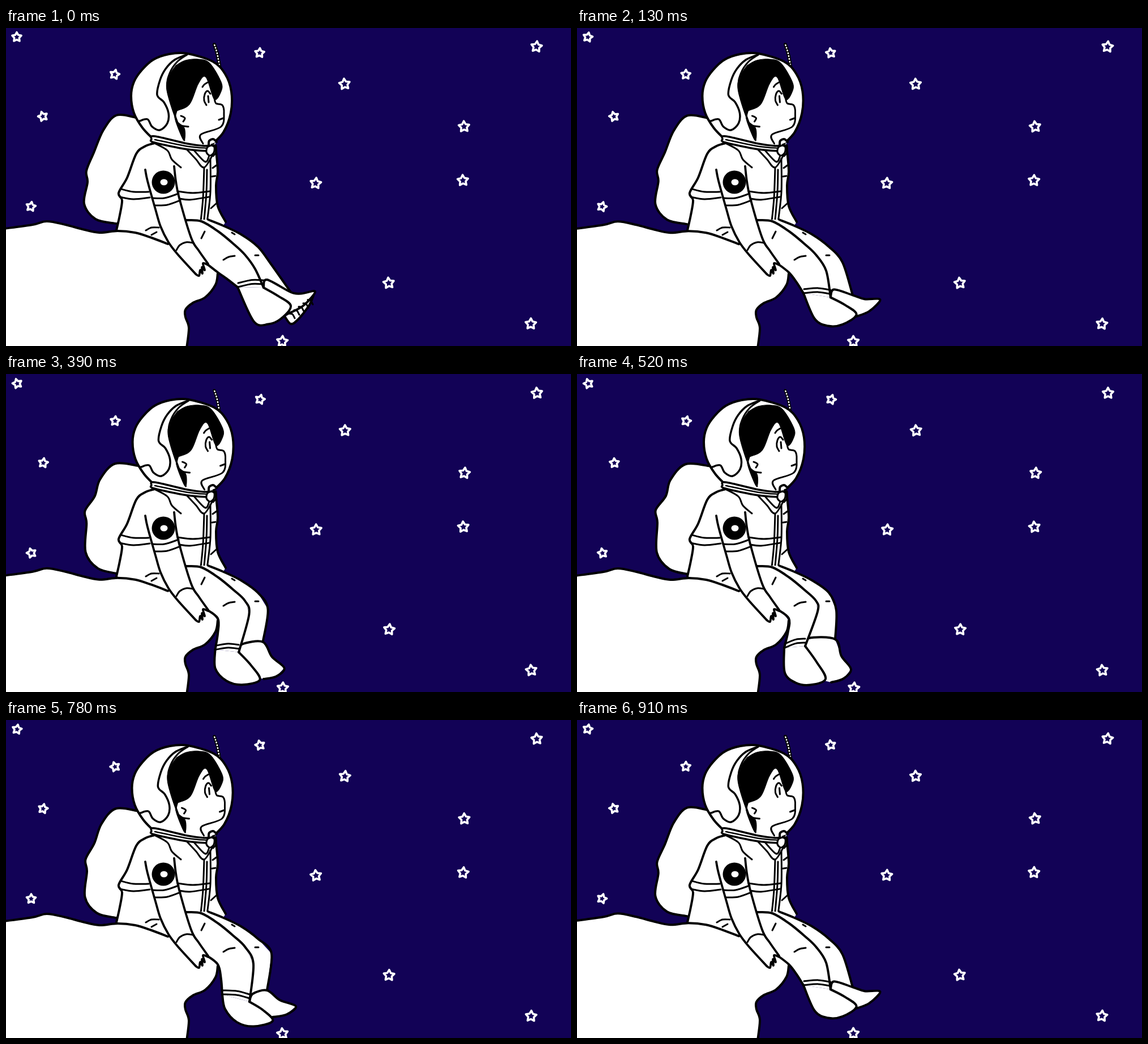
Recreate the animation shown at these times as an HTML page. Size 998 by 561 pixels, loop 1.04 s.

```html
<!DOCTYPE html>
<html lang="en">
<head>
<meta charset="utf-8">
<title>Astronaut swinging legs</title>
<style>
html, body { margin: 0; width: 100%; height: 100%; overflow: hidden; background: #120256; }
svg { display: block; width: 998px; height: 561px; }
path { stroke-linecap: round; stroke-linejoin: round; }
</style>
</head>
<body>
<svg id="stage" viewBox="0 0 998 561"></svg>
<script>
const STEP = 130, LAST = 4;
const stage = document.getElementById('stage');

// Points are [x, y] pairs, written as "x,y x,y"
const parse = s => s.split(' ').map(p => p.split(',').map(Number));
const add = (p, x, y) => [p[0] + x, p[1] + y];
const mix = (a, b, t) => [a[0] + (b[0] - a[0]) * t, a[1] + (b[1] - a[1]) * t];

// Smooth curve through the given points
function smooth(p) {
  let d = 'M' + p[0];
  for (let i = 0; i < p.length - 1; i++) {
    const a = p[i - 1] || p[i], b = p[i], c = p[i + 1], e = p[i + 2] || c;
    d += `C${mix(b, add(b, c[0] - a[0], c[1] - a[1]), 1 / 6)} ${mix(c, add(c, b[0] - e[0], b[1] - e[1]), 1 / 6)} ${c}`;
  }
  return d;
}

const toPoints = s => typeof s === 'string' ? parse(s) : s;
const draw = (d, w, fill = 'none', ink = '#000') =>
  `<path d="${d}" fill="${fill}" stroke="${ink}" stroke-width="${w}"/>`;
const line = (s, w = 3) => draw(smooth(toPoints(s)), w);
const lines = (list, w) => list.map(s => line(s, w)).join('');
const shape = (s, w = 4, fill = '#fff') => draw(smooth(toPoints(s)), w, fill);
const blank = p => `<path d="M${p.join('L')}Z" fill="#fff"/>`;
const shift = (x, y, body) => `<g transform="translate(${x} ${y})">${body}</g>`;

const STARS = '19,16 192,82 65,156 44,315 448,44 598,99 937,33 809,174 807,269 547,274 676,450 927,522 488,553';

function stars(t) {
  return parse(STARS).map(([x, y], i) => {
    const r = i < 5 ? 8.5 : 9.8;
    const turn = Math.sin(i * 2.3 + t * 5) * (i < 5 ? 0.3 : 0.12);
    const pts = Array.from({ length: 10 }, (_, k) => {
      const a = k * Math.PI / 5 - Math.PI / 2 + turn, q = k % 2 ? r * 0.53 : r;
      return [x + t + q * Math.cos(a), y + t + q * Math.sin(a)];
    });
    return draw(`M${pts.join('L')}Z`, 3.6, 'none', '#fff');
  }).join('');
}

function pack(t) {
  const up = parse('230,158 195,154 172,180 155,220 142,252 144,272 138,310 158,337 194,345');
  const down = parse('237,163 192,159 165,187 157,215 139,240 142,262 141,315 163,344 195,353');
  const pts = up.map((p, i) => mix(p, down[i], t));
  return blank([...pts, [262, 270], [270, 190]]) + shape(pts);
}

function torso() {
  const left = parse('262,203 245,209 230,222 214,264 199,291 205,304 201,330 195,357');
  const right = parse('370,207 374,252 371,278 374,314 388,342');
  return blank([...left, [285, 381], [350, 400], ...right.reverse(), [370, 190], [255, 190]]) +
    lines([left, right], 4) +
    lines(['203,284 225,289 252,289', '201,298 225,302 254,299', '303,288 330,291 360,288',
      '306,301 325,303 358,298', '320,215 335,231 350,246 366,222', '333,217 352,236 359,225',
      '350,247 348,300 344,341', '361,230 361,290 355,343', '355,250 354,290 350,338',
      '362,318 372,309', '365,247 372,242', '364,262 370,261', '247,357 257,352 270,352', '257,365 266,360']);
}

function ground(t) {
  const top = parse('-4,355 47,348 72,342 105,348 135,356 165,362 197,359 228,362 257,371 286,382');
  const edge = parse('374,434 370,454 352,476 330,486 317,498 317,511 323,530 319,566');
  return shift(0, t * 2 - 1, blank([...top, [345, 395], ...edge, [-4, 566]]) + lines([top, edge], 4));
}

// Each joint swings on a parabola: forward, middle, back
const JOINTS = {
  knee: '440,425 437,430 425,419',
  shin: '455,458 430,497 403,480',
  calf: '409,457 382,484 366,483',
  heel: '438,518 387,510 367,527',
  toe: '503,490 471,531 439,538',
  farKnee: '467,415 469,412 458,417',
  farShin: '503,466 461,477 456,468',
  farToe: '546,465 512,505 484,521',
  farHeel: '496,505 471,524 449,544'
};

function pose(t) {
  const swing = s => {
    const [a, b, c] = parse(s);
    return [0, 1].map(k => a[k] * (1 - t) * (1 - 2 * t) + b[k] * 4 * t * (1 - t) + c[k] * t * (2 * t - 1));
  };
  return Object.fromEntries(Object.entries(JOINTS).map(([name, s]) => [name, swing(s)]));
}

// Striped underside, seen only when the far foot is kicked up
function sole() {
  const a = [543, 472], b = [493, 510];
  let out = shape([a, [535, 490], [515, 515], [503, 522], b]);
  for (let k = 0.2; k < 1; k += 0.16) {
    const p = mix(a, b, k);
    out += line([p, add(p, 5, 1), add(p, 9, 8)]);
  }
  return out;
}

function legs(t) {
  const { knee, shin, calf, heel, toe, farKnee, farShin, farToe, farHeel } = pose(t);
  const near = [...parse('318,339 345,341 375,359 402,381 422,400'), knee, shin];
  const under = [...parse('352,414 374,431'), mix([378, 433], calf, 0.45), calf];
  const far = [...parse('357,338 382,348 415,364 445,386'), farKnee, farShin];

  const nx = (heel[1] - toe[1]) * 0.2, ny = (toe[0] - heel[0]) * 0.2;
  const boot = [calf, heel, add(mix(heel, toe, 0.3), nx, ny), add(mix(heel, toe, 0.65), nx, ny),
    toe, add(mix(shin, toe, 0.55), -nx / 4, -ny / 4), shin];
  const farBoot = [shin, add(shin, 6, -14), farShin, add(mix(farShin, farToe, 0.5), -3, 3),
    farToe, add(mix(farToe, farHeel, 0.5), 4, 5), farHeel];
  const cuff = h => line([add(calf, 1, 1 - h), add(mix(calf, shin, 0.55), 0, -5 - h), add(shin, 0, -5 - h)]);

  return blank([...far, ...[...near].reverse()]) + line(far, 4) +
    blank([...farBoot, mix(heel, toe, 0.5)]) + (t === 0 ? sole() : '') + line(farBoot, 4) +
    blank([...near, ...[...under].reverse()]) + shape(boot) + lines([near, under], 4) +
    cuff(1) + cuff(8) +
    lines(['345,371 351,359', '384,409 393,404 404,402', '399,361 404,364', '440,401 446,401']);
}

function arm() {
  const left = parse('246,250 250,270 264,320 273,350 287,378 303,399 335,434');
  const right = parse('297,244 300,270 306,300 327,370 340,392 357,416');
  const hand = parse('335,434 341,437 343,427 347,433 346,422 351,427 348,415 357,418');
  return blank([...left, ...hand, ...[...right].reverse()]) + lines([left, right, hand], 3.8) +
    lines(['258,300 280,300 305,292', '263,313 285,312 308,304', '301,392 307,383 318,378 331,379',
      '262,203 285,216 293,232 309,246']) +
    '<circle cx="278" cy="272" r="20.5"/><ellipse cx="279" cy="272" rx="6.5" ry="5.5" fill="#fff"/>';
}

function face() {
  return shape('300,66 317,57 340,55 360,62 380,95 380,112 368,126 353,87 340,98 324,135 301,147 298,156 284,110 287,86 300,66', 1, '#000') +
    shape('298,150 300,165 314,198 315,177 301,164 298,150', 1.5, '#000') +
    lines(['320,47 302,60 289,80 285,105 297,150 315,198', '301,146 299,158 307,171 322,174',
      '309,155 316,159 313,165', '347,104 350,100 356,96', '361,116 356,111 351,117 350,128 354,136',
      '368,124 371,133 382,136 385,150 380,174 344,188 348,204', '376,162 384,159', '357,120 358,131']);
}

function head(t) {
  const rod = smooth(parse('368,29 373,45 378,72'));
  return draw(rod, 6 - t) + `<path d="${rod}" fill="none" stroke="#fff" stroke-width="2.4" stroke-dasharray="3 2" style="stroke-linecap:butt"/>` +
    shift(3 * t, 0,
      shape('259,195 241,176 226,150 221,120 226,95 240,74 260,56 288,46 320,45 365,59 387,81 398,112 397,150 384,184 364,205') +
      line('319,47 298,56 282,72 272,92 267,118 279,131 287,150 285,168 272,180 258,174 250,161 236,164', 3.5) +
      face()) +
    shape('358,206 359,199 366,196 372,201') +
    shape('369,207 350,208 320,204 263,191 257,196 262,202 320,214 358,217', 3.5) +
    line('263,197 322,209 356,212', 2.4) +
    shape('363,207 356,210 354,219 360,225 367,220 368,210 363,207', 3.2) +
    line('371,207 371,219 366,226');
}

// Pendulum timing: slow at both ends, 0 forward to 1 back
const scenes = Array.from({ length: LAST + 1 }, (_, i) => {
  const t = (1 - Math.cos(Math.PI * i / LAST)) / 2;
  return `<g visibility="hidden">${stars(t)}${pack(t)}${torso()}${ground(t)}${legs(t)}${arm()}${head(t)}</g>`;
});
stage.innerHTML = scenes.join('');
const groups = [...stage.children];
let shown = -1;

function tick() {
  const step = Math.floor(performance.now() / STEP) % (2 * LAST);
  const n = Math.min(step, 2 * LAST - step);
  if (n !== shown) {
    groups.forEach((g, i) => g.setAttribute('visibility', i === n ? 'visible' : 'hidden'));
    shown = n;
  }
  requestAnimationFrame(tick);
}
tick();
</script>
</body>
</html>
```
